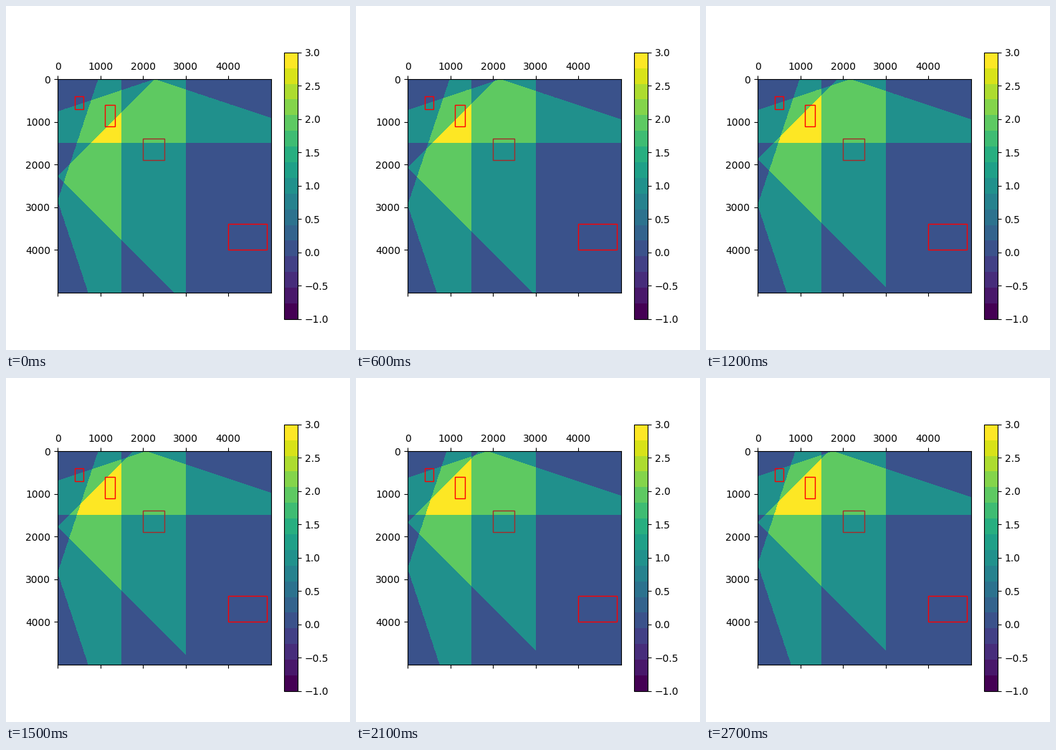
Recreate the animation shown at these times as a matplotlib script. Size 480 by 480 pixels, loop 3000 ms.

```python
import numpy as np
import matplotlib.pyplot as plt
from matplotlib.animation import FuncAnimation
from matplotlib.patches import Rectangle

SIZE = 5000
CELLS = 1250
STEP = 100

# Sensor positions: start plus cumulative moves of one step along the wall.
STEEP = 2850 + STEP * np.cumsum([0, 1, 0, 1, -1, -1, 0, -1, -1, 0])
DIAGONAL = 2270 + STEP * np.cumsum([0, -1, -1, -1, -1, -1, -1, 0, -1, 1])
TOP = 2270 + STEP * np.cumsum([0, -1, 0, -1, 1, -1, -1, -1, -1, 0])

ZONES = [
    (400, 400, 200, 300, "red"),
    (1100, 600, 250, 500, "red"),
    (2000, 1400, 500, 500, "brown"),
    (4000, 3400, 900, 600, "red"),
]

centers = (np.arange(CELLS) + 0.5) * SIZE / CELLS
x, y = np.meshgrid(centers, centers)


def wedge(depth, along, apex, slope, reach):
    """Cells seen from the wall at apex, opening by slope, up to reach."""
    return (np.abs(along - apex) <= slope * depth) & (depth < reach)


def coverage(i):
    return (
        wedge(x, y, STEEP[i], 3, 1500).astype(float)
        + wedge(x, y, DIAGONAL[i], 1, 3000)
        + wedge(y, x, TOP[i], 3, 1500)
    )


fig = plt.figure(figsize=(4.8, 4.8), dpi=100)
ax = fig.add_axes([0.15, 0.09, 0.775, 0.775])
image = ax.matshow(
    coverage(0),
    cmap=plt.get_cmap("viridis", 17),
    vmin=-1,
    vmax=3,
    extent=(-0.5, SIZE - 0.5, SIZE - 0.5, -0.5),
)
ax.set_xticks(range(0, SIZE, 1000))
ax.set_yticks(range(0, SIZE, 1000))
fig.colorbar(image)

for left, top, width, height, color in ZONES:
    ax.add_patch(Rectangle((left, top), width, height, fill=False, edgecolor=color, linewidth=1))


def update(i):
    image.set_data(coverage(i))
    return [image]


anim = FuncAnimation(fig, update, frames=len(TOP), interval=300, repeat=True)
plt.show()
```
